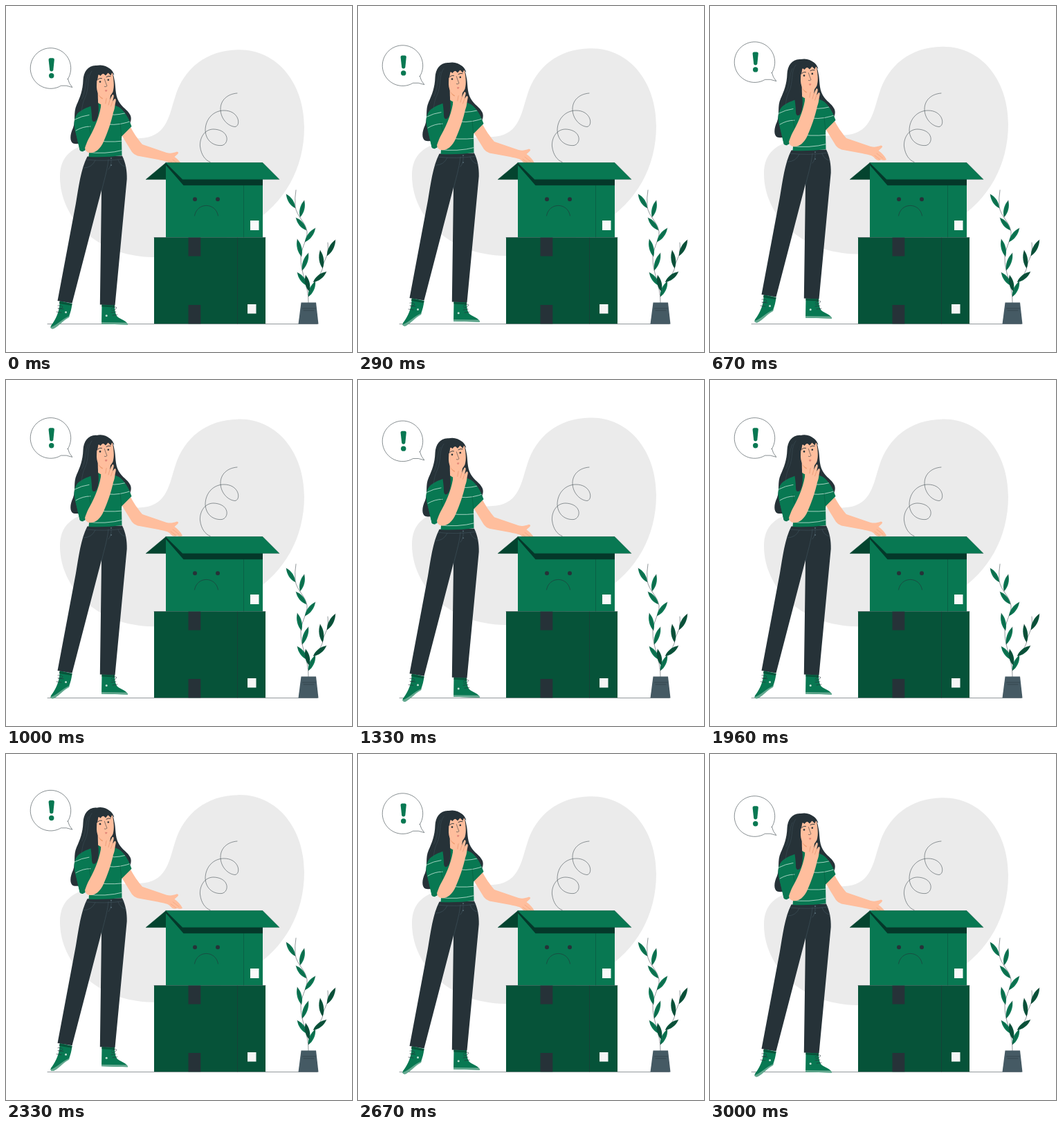
Recreate the animation shown at these times as an HTML page with a canvas. Size 500 px wide and 500 px high, loop 3040 ms.

```html
<!DOCTYPE html>
<html lang="en">
<head>
<meta charset="utf-8">
<title>Empty box</title>
<style>
html, body { margin: 0; width: 100%; height: 100%; overflow: hidden; background: #fff; }
canvas { display: block; width: 500px; height: 500px; }
</style>
</head>
<body>
<canvas id="stage"></canvas>
<script>
const canvas = document.getElementById('stage');
const ctx = canvas.getContext('2d');
const ratio = window.devicePixelRatio || 1;
canvas.width = canvas.height = 500 * ratio;

const GREEN = '#087852', DEEP = '#065339', SHADE = '#04442f', BLACKISH = '#04382a';
const INK = '#263238', SLATE = '#455a64', SKIN = '#ffbe9d', GREY = '#ebebeb';
const STRIPE = '#d6eee3', SOLE = '#63a88f', EDGE = '#0a4b38';
const LOOP = 3040, STEP = 1000 / 24;

function fill(d, color) {
  ctx.fillStyle = color;
  ctx.fill(new Path2D(d));
}
function line(d, color = INK, width = 0.5) {
  ctx.strokeStyle = color;
  ctx.lineWidth = width;
  ctx.stroke(new Path2D(d));
}
function dot(x, y, r, color) {
  ctx.fillStyle = color;
  ctx.beginPath();
  ctx.arc(x, y, r, 0, 7);
  ctx.fill();
}
function rect(x, y, w, h, color) {
  ctx.fillStyle = color;
  ctx.fillRect(x, y, w, h);
}
function lifted(dy, draw) {
  ctx.save();
  ctx.translate(0, -dy);
  draw();
  ctx.restore();
}

// Linear rise of 10px and back again
function float(t, period) {
  const p = (t / period) % 1;
  return 10 * (1 - Math.abs(1 - 2 * p));
}

function blob() {
  fill('M335 63.3C392 62 431 112 431 175C431 235 402 285 355 314C310 340 270 363 213 363C130 362 78 305 78 247C78 217 95 203 130 196C150 191 180 193 200 190.5C233 186 236 157 244.5 131C257 90 290 64 335 63.3Z', GREY);
}

function bubble() {
  const d = 'M89.4 105.5A29.3 29.3 0 1 0 79.5 115.2Q87 114 95.8 117.5Q90.8 112 89.4 105.5Z';
  fill(d, '#fff');
  line(d, INK, 0.55);
  fill('M61.6 78Q61.5 75.3 64 75.3L67.5 75.3Q70 75.3 69.8 78L68.3 92.5Q68 94.5 65.7 94.5Q63.5 94.5 63.2 92.5Z', GREEN);
  dot(65.7, 100.8, 3.7, GREEN);
}

function shoes() {
  fill('M78 426L95.5 430C95 437 93 443 91 449C83 453 77 461 69 466C66 467 63.5 466 65 462C70 456 76 444 77 435Z', GREEN);
  fill('M92 447.5L91 450C83 454 76 463 69 466.3Q64.5 467 64.3 464C73 462 80 453 92 447.5Z', SOLE);
  fill('M77.5 427L95.5 430.5L95 433L77 430Z', DEEP);
  line('M75 433Q80 432 82 435Q79 439 75 437M76 437L83 438M73 442L80 443', INK, 0.6);
  dot(86.5, 442.5, 1.5, '#bfe0d2');

  fill('M138.5 431L157 432C157 440 158 445 161 449C166 453 175 455 176 460.5L138 459.5Z', GREEN);
  fill('M138 457L174 457.5Q176 458.5 176 460.6L138 459.4Z', SOLE);
  fill('M138.5 432L157 433L157 435.5L138.5 434.5Z', DEEP);
  line('M152 438Q157 433 160 436Q158 440 153 440M152 443L159 442M154 447L161 446', INK, 0.6);
  dot(145.2, 447.6, 1.5, '#bfe0d2');
}

function pants() {
  fill('M117.5 217.5L168 216.5C173 227 175 238 174.7 250L157.5 432.5L135.8 431.5L137.8 285L138 266L95.5 429.5L74.5 426L101 285C105 262 108 236 117.5 217.5Z', INK);
  line('M116 222Q142 225 170 221M148 222C146 240 141 254 138 268M112 234Q124 234 129 223M162 222Q165 231 173 232M152 222Q153 230 148 236', SLATE);
  dot(152, 220, 0.9, '#607680');
  dot(152, 230, 0.9, '#607680');
}

function farArm() {
  fill('M166 185L180 175C184 183 191 193 197 200L232 212C238 213.5 241 212.5 247 210.5Q250.5 211 248 214L243.5 218C248 221 252 225 255 231Q252 233 247 231Q242 234 238 229C234 224 228 224 220 222L190 216.5Q185 215 182 211Z', SKIN);
  line('M238 225L246 231M241 222L250 229', '#eb996e');
}

function backHair() {
  fill('M131 86C119 85 112 95 111.5 107C111 122 107 132 102 143C97 154 101 165 97 176C92 186 92 196 97 198.5C105 201 118 196 122 185L150 150C158 158 164 173 172 174.5C180 173 182.5 163 179.5 157.5C176 150 168 147 163 138C157 128 159 115 156.5 106C155 92 145 83 131 86Z', INK);
}

function shirt() {
  const d = 'M133 140C124 145 113 147 106 153C99 159 97 168 100 180L107 209L114 209L122 190L119.5 218Q145 219 167.5 216L167 188.5L181.5 174C177 161 171 151 163 146L148 139.5Q141 144 133 140Z';
  fill(d, GREEN);
  ctx.save();
  ctx.clip(new Path2D(d));
  line('M150 157Q164 158 178 153M147 171Q165 173 184 165M122 193Q144 198 170 195M116 211Q143 215 170 208', STRIPE, 0.75);
  ctx.restore();
  line('M167 190L165 170', DEEP);
}

function head() {
  fill('M132.5 118L148 124L149 140Q141 146 133 140Z', SKIN);
  fill('M134 125Q140 134 148 132L148 136Q138 137 134 129Z', '#eb996e');
  fill('M131.5 100L153.5 95C155.5 105 157 116 154.5 124C151 131 146 134 141 133.5C134 132 130.5 123 131 114Z', SKIN);
  // Fringe, then the strand resting on the shoulder
  fill('M128 105C127 96 131 89 141 88C149 88 154 92 156.5 100L153 96.5L151.5 100.5L147.5 96.5L144 100.5L140 97L136.5 101L133.5 98.5L132 108Z', INK);
  fill('M130 98C124 115 131 124 132.5 136C135 148 134 163 129 166.5Q124 169 124 161C124 147 119 134 122 116Z', INK);
  line('M124 94C116 104 121 119 114 133C109 143 110 154 106 166M119 99C114 110 116 122 110 134', SLATE, 0.4);
  line('M133 106Q135.5 103.5 138.5 104.5M145 102.5Q148 100.5 151 101.5', INK, 0.9);
  dot(136, 109.5, 1.3, INK);
  dot(147.8, 106.8, 1.3, INK);
  line('M142.3 105.5Q144 111 146 115.5Q144.3 117.5 142.3 116.5', INK, 0.55);
  fill('M142.8 121.8Q144.5 120.3 146.5 121.5Q146.2 123.8 144 124Z', '#e2897a');
}

function nearArm() {
  fill('M137 146C137 139 140 134 141.5 128Q143 125.5 144.5 128L145 134L148.8 126.7Q151 125 151.2 128L150 136L153.5 128.5Q156 127 155.7 131L154 138L157 134Q159.5 134 158.5 138C157 144 157.5 148 155 154C152 168 146 185 141 196C136 208 127 213.5 119.5 212C113 210 112.5 202 117 196C127 179 134 163 137 146Z', SKIN);
  line('M145 134L143.8 141M150 136L148 143M154 138L151.5 145', '#d9805a');
  fill('M106 153C118 157 122 172 122 184L112 210Q108 211 106.5 208L100 180C97 167 99 159 106 153Z', GREEN);
  line('M99.5 164Q109 159 120 157.5M101 180Q111 174 122 174', STRIPE, 0.75);
  line('M122 184L120 172', DEEP);
}

function woman() {
  shoes();
  farArm();
  backHair();
  pants();
  shirt();
  head();
  nearArm();
}

function boxes() {
  rect(214, 334.5, 161, 124.7, DEEP);
  rect(263.5, 334.5, 17.8, 27, INK);
  rect(263.5, 432, 17.8, 27.2, INK);
  line('M334.5 335V459', INK);
  rect(349, 431, 12.5, 13.5, '#f5f5f5');

  rect(231, 226.5, 140, 108, GREEN);
  line('M343.5 259V334', EDGE);
  line('M214 334.5H375', INK, 0.4);
  rect(353, 310, 12.5, 14, '#fafafa');
  fill('M231 226.5L255 250.5H371V259.3H256.5L231 230Z', BLACKISH);
  fill('M231 226.5L202 250.7H231Z', SHADE);
  fill('M231 226.5H371L395 250.6H255.5Z', GREEN);
  line('M231 226.5H371L395 250.6H255.5ZL202 250.7H231', EDGE, 0.4);

  dot(273, 279.3, 3, INK);
  dot(306, 279.3, 3, INK);
  line('M272.5 303C276 283.4 303 283.4 306.5 303', INK, 0.6);
}

function spring() {
  line('M334 126C320 127 310 136 310 149C310 163 321 174 331 174.5C340 173 337 151 315 151C300 151 288 163 288 180C289 196 301 202.5 312 201.5C323 199 323 179 300 178C286 178 279.5 192 280.5 203C282 215 288 223 295 225.5');
}

function leaf(tipX, tipY, baseX, baseY, color) {
  const dx = baseX - tipX, dy = baseY - tipY, n = Math.hypot(dx, dy);
  ctx.save();
  ctx.translate(tipX, tipY);
  ctx.rotate(Math.atan2(dy, dx));
  fill(`M0 0C${n * .3} -4.5 ${n * .75} -4.2 ${n} 0C${n * .75} 4.2 ${n * .3} 4.5 0 0Z`, color);
  line(`M0 0H${n}`, INK, 0.4);
  ctx.restore();
}

const leaves = [
  [405, 272, 418, 292, GREEN], [431, 281, 425, 305, GREEN],
  [419, 306, 434, 324, GREEN], [447, 321, 432, 341, GREEN],
  [421, 337, 427, 362, GREEN], [437, 357, 428, 382, GREEN],
  [421, 385, 435, 404, GREEN], [447, 398, 437, 420, GREEN],
  [433, 389, 438, 412, DEEP], [454, 353, 457.5, 379, DEEP],
  [476, 338, 464, 361, DEEP], [463, 384, 444, 399, DEEP]
];

function plant() {
  line('M437 429C438 405 425 385 426 362C428 345 436 338 435 326C433 312 420 304 418 290Q417 277 419 266M437 417C441 400 457 389 458 376C460 365 467 362 465 342');
  leaves.forEach(l => leaf(...l));
  fill('M426.5 428.5H448L451.5 459.5H422.5Z', SLATE);
  line('M428.5 437H447M430 440H445');
}

function draw(t) {
  const now = Math.floor((t + 5) / STEP) * STEP + STEP / 2;
  const sway = float(now, 1500) - 0.28;
  ctx.setTransform(ratio, 0, 0, ratio, 0, 0);
  rect(0, 0, 500, 500, '#fff');
  ctx.lineCap = ctx.lineJoin = 'round';
  lifted(float(now, 3000) - 0.14, blob);
  line('M60 459.5H450', INK);
  spring();
  lifted(sway, () => { bubble(); woman(); });
  boxes();
  plant();
}

const start = performance.now();
function tick() {
  draw((performance.now() - start) % LOOP);
  requestAnimationFrame(tick);
}
tick();
</script>
</body>
</html>
```
